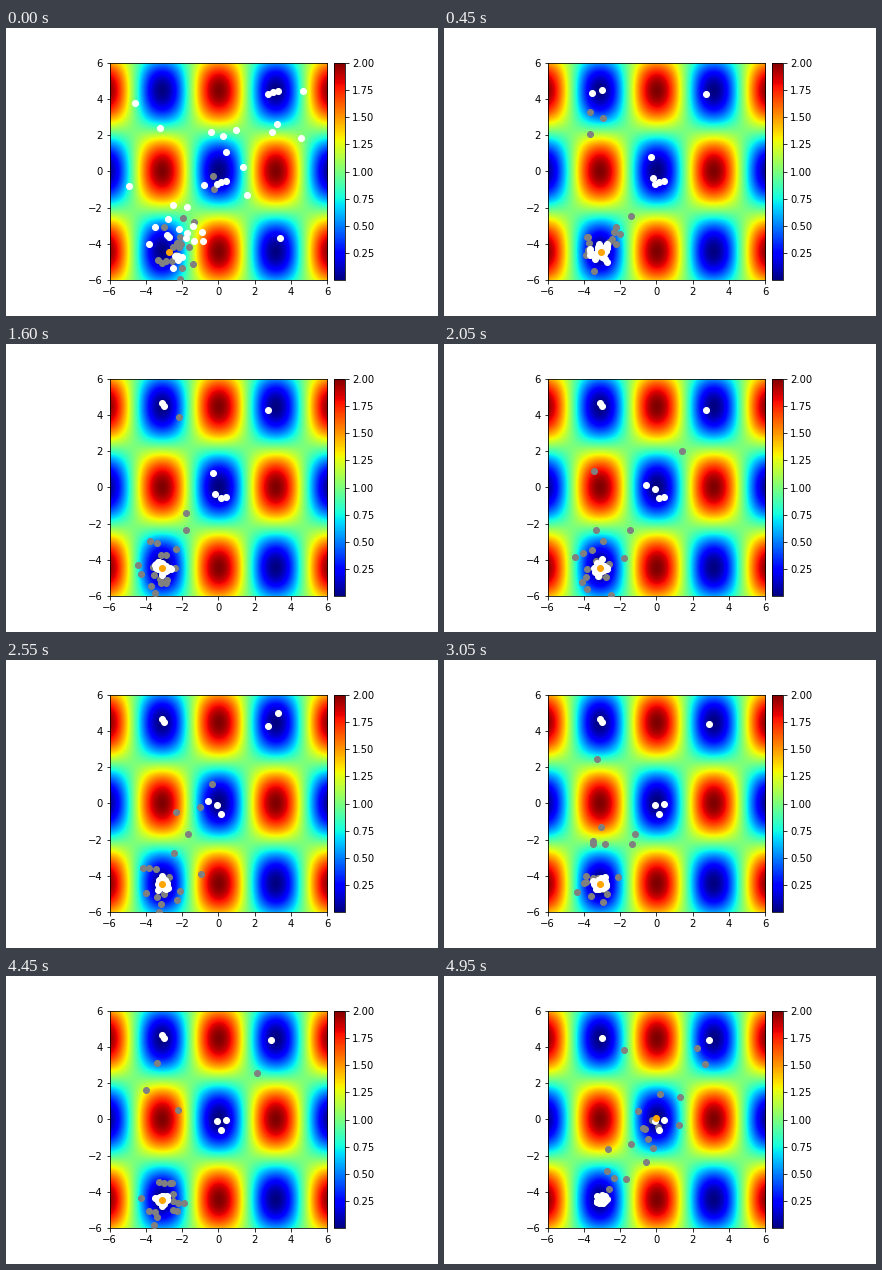
Recreate the animation shown at these times as a matplotlib script. Size 432 by 288 pixels, loop 5 s.

```python
import math

import matplotlib.pyplot as plt
import numpy as np
from matplotlib.animation import FuncAnimation
from mpl_toolkits.axes_grid1 import make_axes_locatable

STEPS, INTERVAL = 100, 50
LIMIT = 6
CROWD, MOVES_PER_STEP, EGGS_PER_STEP = 36, 4, 20
HOME = np.array([-3.1, -4.45])
LEAP = 96  # step at which the global optimum is found

# Lone nests in the other wells: x, y, first step, last step
LONE = [
    (-3.1, 4.65, 10, 95), (-3.0, 4.5, 6, 99), (-3.55, 4.3, 5, 22),
    (2.75, 4.25, 0, 60), (3.3, 5.0, 42, 58), (2.9, 4.4, 61, 99),
    (-0.3, 0.8, 6, 40), (-0.55, 0.1, 41, 60), (-0.1, -0.1, 38, 99),
    (-0.2, -0.35, 8, 37), (0.15, -0.6, 0, 99), (0.4, -0.55, 0, 45),
    (0.4, -0.05, 60, 99), (-0.05, -0.7, 0, 24),
]

rng = np.random.RandomState(7)


def griewank(x, y):
    return 1 + (x**2 + y**2) / 4000 - np.cos(x) * np.cos(y / math.sqrt(2))


def first_crowd():
    """Half the nests near the winning well, half in any low region."""
    near = rng.normal((-2.2, -3.5), 0.8, (CROWD // 2, 2))
    spots = rng.uniform(-5, 5, (400, 2))
    low = spots[griewank(*spots.T) < 1.05]
    return np.concatenate([near, low[:CROWD - len(near)]])


def best_at(step):
    if step >= LEAP:
        return np.array([0, 0.05])
    return HOME + (0.35 * math.exp(-step / 4), 0)


def lone_at(step):
    return np.array([(x, y) for x, y, first, last in LONE
                     if first <= step <= last])


def lay_eggs(nests, best):
    """Trial points scattered along the lines from the best to other nests."""
    picked = nests[rng.randint(len(nests), size=EGGS_PER_STEP)]
    reach = rng.uniform(-0.3, 0.9, (EGGS_PER_STEP, 1))
    return best + reach * (picked - best) + rng.normal(0, 0.7, picked.shape)


def build_track():
    crowd = first_crowd()
    track = []
    for step in range(STEPS):
        if step:
            # A few nests at a time resettle, ever closer to home.
            movers = (step * MOVES_PER_STEP + np.arange(MOVES_PER_STEP)) % CROWD
            spread = 0.12 + 0.18 * math.exp(-step / 35)
            crowd[movers] = rng.normal(HOME, spread, (MOVES_PER_STEP, 2))
        lone, best = lone_at(step), best_at(step)
        eggs = lay_eggs(np.concatenate([lone, crowd[:12]]), best)
        track.append((eggs, np.concatenate([lone, crowd]), best[None]))
    return track


track = build_track()

fig, ax = plt.subplots(figsize=(6, 4), dpi=72, facecolor="white")
fig.subplots_adjust(left=0.125, right=0.9, bottom=0.125, top=0.88)

axis = np.linspace(-LIMIT, LIMIT, 240)
image = ax.imshow(griewank(*np.meshgrid(axis, axis)), cmap="jet",
                  origin="lower", vmin=0.002, vmax=2.004,
                  extent=(-LIMIT, LIMIT, -LIMIT, LIMIT),
                  interpolation="bilinear")
ticks = np.arange(-LIMIT, LIMIT + 1, 2)
ax.set(xticks=ticks, yticks=ticks)

cax = make_axes_locatable(ax).append_axes("right", size="5%", pad=0.1)
fig.colorbar(image, cax=cax, ticks=np.arange(0.25, 2.01, 0.25), format="%.2f")

dots = [ax.scatter([], [], color=color, zorder=3 + layer)
        for layer, color in enumerate(("gray", "white", "orange"))]
ax.set(xlim=(-LIMIT, LIMIT), ylim=(-LIMIT, LIMIT))


def update(step):
    for group, points in zip(dots, track[step]):
        group.set_offsets(points)
    return dots


anim = FuncAnimation(fig, update, frames=STEPS, interval=INTERVAL,
                     repeat=True, repeat_delay=0)
plt.show()
```
